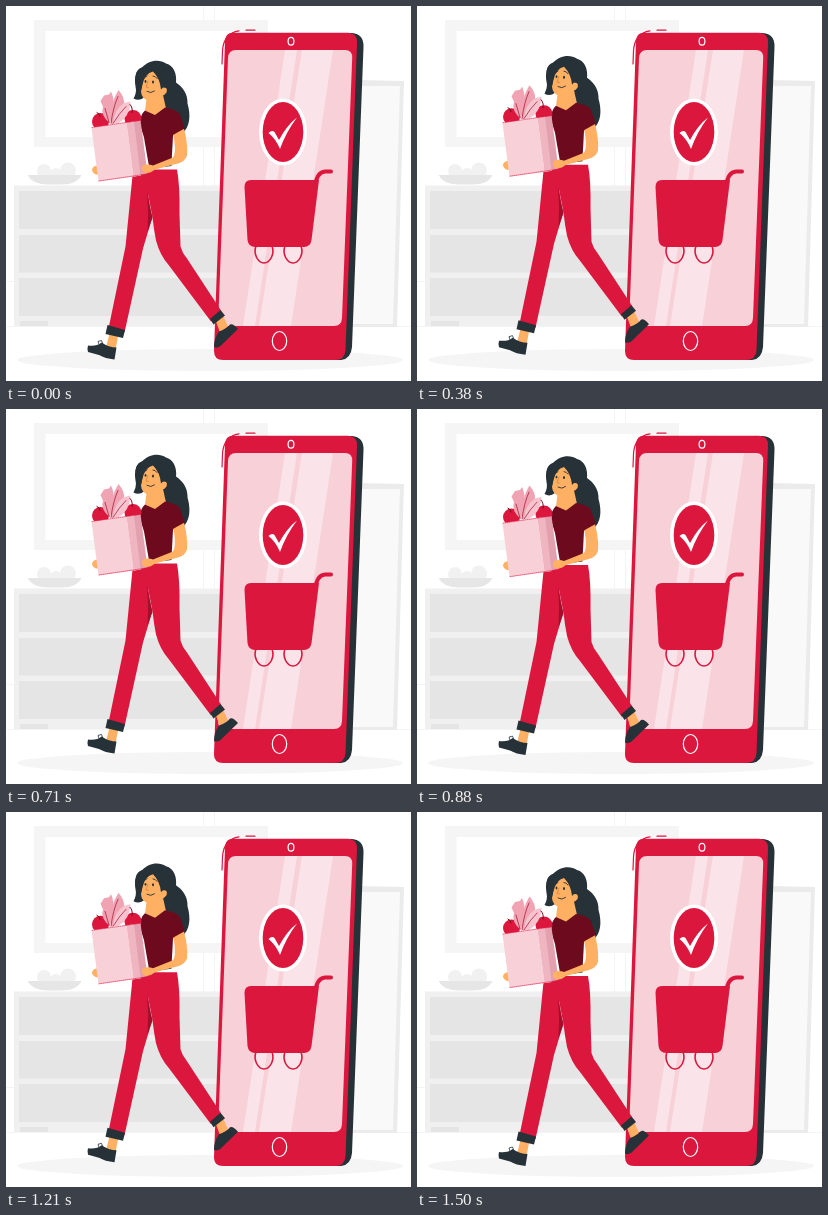
Recreate the animation shown at these times as an HTML page. Size 405 px wide and 375 px high, loop 1.54 s.

```html
<!DOCTYPE html>
<html lang="en">
<head>
<meta charset="utf-8">
<title>Shopping</title>
<style>
html, body { margin: 0; width: 100%; height: 100%; overflow: hidden; background: #fff; }
svg { display: block; width: 100vw; height: 100vh; }
.red { fill: #dc173e; }
.dark { fill: #263238; }
.skin { fill: #ffb062; }
.shirt { fill: #6e0a1e; }
.pink { fill: #f8d0d8; }
.leaf { fill: #f0a3b3; }
.shade { fill: #a10f2c; }
.line { fill: none; stroke-linecap: round; stroke-linejoin: round; }
</style>
</head>
<body>
<svg viewBox="0 0 405 375" preserveAspectRatio="none">
  <g id="room">
    <path d="M197.5 0V180M208.5 0V180M0 275.5H9M0 320.5H405" stroke="#f4f4f4" fill="none"/>
    <path fill="#f5f5f5" d="M28 14H262V141H28Z"/>
    <path fill="#fff" d="M39.500 25H250V131H39.500Z"/>
    <path fill="#ebebeb" d="M352 74L398 75L391 321H340Z"/>
    <path fill="#f9f9f9" d="M350 80L394 80L387 318H338Z"/>
    <g fill="#f1f1f1">
      <circle cx="38" cy="165" r="7"/><circle cx="50" cy="168" r="6"/><circle cx="62" cy="164.500" r="8"/>
    </g>
    <path fill="#e6e6e6" d="M21.500 169H75.500Q71 178.500 55 178.500H41Q26 178 21.500 169Z"/>
    <path fill="#f0f0f0" d="M8 179.500H220V320H8Z"/>
    <path fill="#e5e5e5" d="M13 185H218V223H13ZM13 229H218V266.500H13ZM13 272H218V310H13ZM14 315H42V320H14Z"/>
    <ellipse cx="204" cy="354" rx="193" ry="11" fill="#f5f5f5"/>
  </g>

  <g id="phone">
    <path class="dark" d="M335 27H346Q358 28 357.500 41L346 341Q345 353 335 354H320Z"/>
    <path class="red" d="M227 26.700H342Q351.500 27 351 37L339.500 344Q339 354 329 354H217Q208 354 208 345L219 35Q219.500 26.700 227 26.700Z"/>
    <path class="pink" d="M230 44H339Q346.500 44 346.200 52L336 312Q335.500 320 328 320H219Q212 320 212.300 313L222 52Q222.500 44 230 44Z"/>
    <path fill="#fbe4e9" d="M279 44H291L249 320H237ZM296 44H327L285 320H253Z"/>
    <g fill="none" stroke="#fff" stroke-width="1.200">
      <ellipse cx="285" cy="35.300" rx="2.900" ry="3.900"/>
      <ellipse cx="273.500" cy="335" rx="7.200" ry="9.500"/>
    </g>
    <ellipse cx="277" cy="126" rx="24" ry="33.500" fill="#fff"/>
    <ellipse class="red" cx="277" cy="126" rx="20.300" ry="30"/>
    <path fill="#fff" d="M262.500 127Q266 123.500 268.500 126L273 134Q281 119 291 111.500Q280 126 274 143Q270 133 262.500 127Z"/>
    <path class="red" d="M245 174H313L305.500 234Q304.500 241 298 241H249Q242.500 241 241.500 234L238.500 181Q238.500 174 245 174Z"/>
    <g class="line" stroke="#dc173e">
      <path stroke-width="4" d="M309 180Q311 166 319 165.500H325"/>
      <path stroke-width="1.600" d="M250 240C247 248 252 257 258 257S269 248 266 240M279 240C276 248 281 257 287 257S298 248 295 240"/>
      <path stroke-width="1.200" d="M216 58L216.500 45Q217.500 27 233 24.800M240 24.200H249"/>
    </g>
  </g>

  <g id="woman">
    <!-- hair behind -->
    <path class="dark" d="M136 62C142 55 153 53 160 58C168 60 171 69 170 77C176 81 182 88 181.500 98C185 110 184 122 176 128C174 124 168 123 164 112L150 98L138 92Q133 96 127.500 93Q131 87 129.500 81Q127 66 136 62Z"/>

    <!-- legs -->
    <path class="red" d="M127 165L145 164L142 188L146 213L137 243L118.500 327L102.500 323L119.500 241Z"/>
    <path class="red" d="M141 164L171 164Q174 180 173.500 208L174.500 241Q176 247 181 253L215 305L205 316L163 260Q154 250 150 235Q148 225 146.500 212L141.500 186Z"/>
    <path class="shade" d="M141 186Q143 206 141.500 226L146.500 212Q143 200 141 186Z"/>
    <path class="skin" d="M103.500 328L112 331L109.500 344L100.500 340Z"/>
    <path class="dark" d="M101.500 319.500L119 324.500L117 332.500L99.500 328.500Z"/>
    <path class="dark" d="M82 340Q91 341 95.500 337Q103 342 110.500 342L108.500 354Q99 353 93 349.500L82 346.500Q81 343 82 340Z"/>
    <path class="line" stroke="#263238" stroke-width=".8" d="M93 339L92 336L95.500 335L97 339"/>

    <path class="skin" d="M210 316L217 310L222 321L214 327Z"/>
    <path class="dark" d="M204 313.500L214.500 304.500L219 310L207.500 319Z"/>
    <path class="dark" d="M213 326Q221 323 224 319Q227 317.500 232 323.500L214 341Q210 343 208 341.500Q208 333 213 326Z"/>

    <!-- torso -->
    <path class="skin" d="M141 90L156 85L160 103L149 110L139 105Z"/>
    <path class="shirt" d="M139 105L149 109.500L159 102Q171 104 174 109L178.500 123L167 130L165.500 158L143 161L138 132L134 119Q134 109 139 105Z"/>
    <path class="dark" d="M144 160L165.500 157V160.500L145 163Z"/>

    <!-- face -->
    <path class="skin" d="M138 69Q147 60 156 72L158 82Q162 82 160.500 87Q158 90.500 155.500 90Q151 95.500 143 95Q135.500 93.500 135 86Z"/>
    <path class="dark" d="M130 76Q128 63 138 61.500Q150 57 158 65L162 83Q158 80 155 84Q154 73 147 66Q139 68 136.500 79L134 89Z"/>
    <g class="line" stroke="#263238" stroke-width=".9">
      <path d="M138.500 72L141 70.500M147 70.500Q149.500 70.500 151 73"/>
      <path d="M141 86Q145 88.500 148.500 85.500"/>
    </g>
    <path class="line" stroke="#d9813a" stroke-width=".8" d="M142 76L140 81.500L142.500 82"/>
    <ellipse class="dark" cx="139.500" cy="76" rx=".9" ry="1.400"/>
    <ellipse class="dark" cx="147" cy="76.500" rx="1" ry="1.500"/>

    <!-- bag contents -->
    <circle class="red" cx="94.500" cy="116" r="8.500"/>
    <circle class="red" cx="127" cy="113" r="8.500"/>
    <path class="leaf" d="M104 118Q94 110 97 101L94.500 95.500L98 90L103 89L105 86Q109 94 107 105Z"/>
    <path class="leaf" d="M105 118Q104 97 112.500 84.500Q119 92 118 99Q114 110 107 118Z"/>
    <path fill="#f6c3ce" d="M107 118Q108 104 118 97.500L124.500 96Q124 111 112 118Z"/>
    <path class="line" stroke="#a10f2c" stroke-width=".7" d="M105 118Q107 102 112 91M107 118Q113 108 120 101M103 117L99 103"/>
    <path class="line" stroke="#6e0a1e" stroke-width="1" d="M94 111Q94 108 91 107M126 107Q127 102 124 99"/>

    <!-- bag -->
    <path class="skin" d="M93 160Q86 160 86 165Q88 170 94 169Z"/>
    <path class="pink" d="M85.500 122L128 116L135 170L92.500 176Z"/>
    <path fill="#e3a0af" d="M121 117L134.500 115L141.500 168L128 171Z"/>
    <path fill="#efb6c2" d="M121 117L128 116L134.500 170L128 171Z"/>
    <path class="line" stroke="#dc173e" stroke-width=".6" stroke-dasharray="1 1" d="M86 122L134 115M93 175.500L141 168.500"/>

    <!-- near arm -->
    <path class="skin" d="M167 128L178 123Q182 139 181 150Q179 156 172 158L149 164Q143 169 138 167Q134 164 137 160Q142 158 147 160L167 152Q171 146 167 128Z"/>
    <path class="shirt" d="M166 108Q172 105 174 110L178.500 123L166 130Z"/>
  </g>
</svg>
<script>
const LOOP = 1540, PEAK = 730, LIFT = 9.8;
const woman = document.getElementById('woman');

// constant speed up, then down
function lift(t) {
  const d = Math.abs(t - PEAK);
  return LIFT * (1 - Math.min(d, LOOP - d) / (LOOP / 2));
}

function draw(ms) {
  woman.setAttribute('transform', `translate(0 ${-lift(ms % LOOP)})`);
}

let start = null;
function tick(now) {
  if (start === null) start = now;
  draw(now - start);
  requestAnimationFrame(tick);
}
draw(0);
requestAnimationFrame(tick);
</script>
</body>
</html>
```
